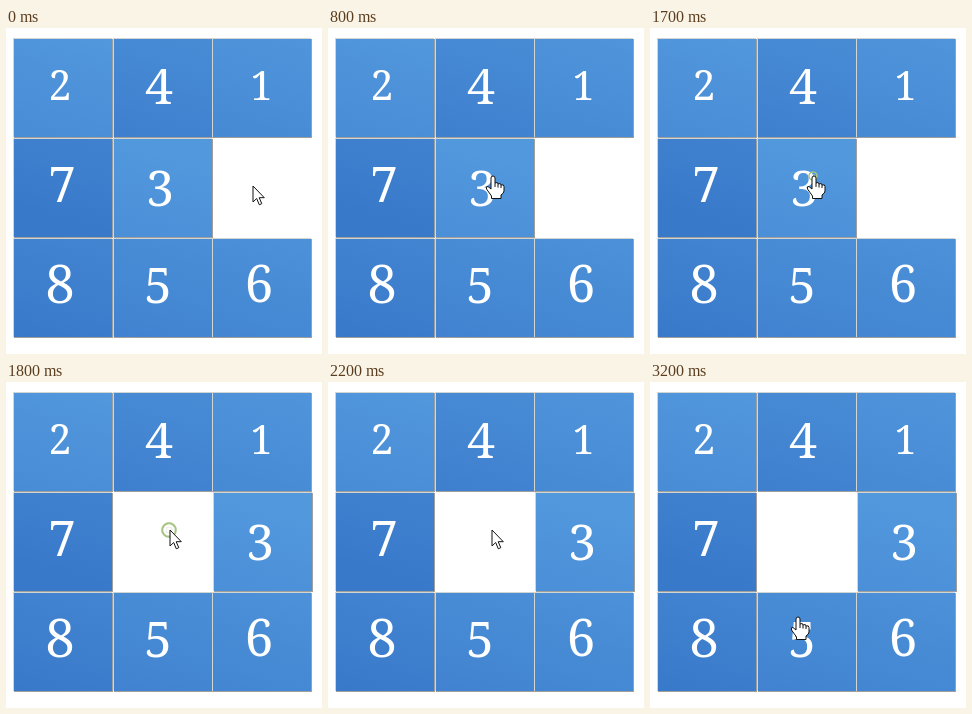
These frames come from a looping animation (316x326 px, 3.3 s). An HTML page:

```html
<!DOCTYPE html>
<html lang="en">
<head>
<meta charset="utf-8">
<title>Sliding puzzle</title>
<style>
  html, body { margin: 0; width: 100%; height: 100%; overflow: hidden; background: #fff; }
  svg { display: block; width: 316px; height: 326px; }
  text {
    font-family: "Noto Serif", serif;
    font-variant-numeric: lining-nums;
    fill: #fff;
    text-anchor: middle;
  }

  /* every change is a hard cut; 100 ms = 3.03 % */
  #tile3, #cursor, #arrow, #hand, #ring { animation: 3300ms step-end infinite; }
  #tile3 { animation-name: slide; }
  #cursor { animation-name: move; }
  #arrow { animation-name: arrow; }
  #hand { animation-name: hand; }
  #ring { animation-name: ring; transform-origin: 0 0; }

  @keyframes slide {
    0% { transform: translate(0, 0); }
    54.54%, 100% { transform: translate(100px, 0); }
  }
  @keyframes move {
    0% { transform: translate(247px, 158px); }
    3.03% { transform: translate(232px, 154px); }
    6.06% { transform: translate(198px, 149px); }
    9.09% { transform: translate(172px, 148px); }
    12.12% { transform: translate(167px, 148px); }
    15.15%, 48.48% { transform: translate(165px, 148px); }
    51.51%, 84.84% { transform: translate(164px, 148px); }
    87.87% { transform: translate(161px, 168px); }
    90.9% { transform: translate(155px, 200px); }
    93.93% { transform: translate(150px, 226px); }
    96.96%, 100% { transform: translate(148px, 235px); }
  }
  @keyframes arrow {
    0%, 54.54% { opacity: 1; }
    6.06%, 93.93%, 100% { opacity: 0; }
  }
  @keyframes hand {
    0%, 54.54% { opacity: 0; }
    6.06%, 93.93%, 100% { opacity: 1; }
  }
  @keyframes ring {
    0% { transform: scale(.4); opacity: 0; }
    51.51% { transform: scale(.45); opacity: 1; }
    54.54% { transform: scale(.75); opacity: 1; }
    57.57% { transform: scale(1); opacity: 1; }
    60.6% { transform: scale(1.12); opacity: .6; }
    63.63% { transform: scale(1.2); opacity: .25; }
    66.66%, 100% { transform: scale(1.2); opacity: 0; }
  }
</style>
</head>
<body>
<svg viewBox="0 0 316 326">
  <defs>
    <linearGradient id="sky" gradientUnits="userSpaceOnUse" x1="200" y1="0" x2="110" y2="300">
      <stop offset="0" stop-color="#5298dd"/>
      <stop offset="1" stop-color="#3979ca"/>
    </linearGradient>
  </defs>
  <g id="board"></g>
  <g transform="translate(163 148)">
    <g id="ring" fill="none">
      <circle r="9" stroke="#a8c583" stroke-width="2.8"/>
      <circle r="4" stroke="#dedfd6"/>
    </g>
  </g>
  <g id="cursor" fill="#fff" stroke="#111" stroke-linejoin="round">
    <path id="arrow" d="M0 0V16L3.7 12.5L6.3 18.8L8.8 17.7L6.2 11.7H11.3Z"/>
    <path id="hand" d="M-2 2Q-2 0 0 0T2 2V7Q5 5.5 5 8Q8 6.5 8 9Q11 8 11 10.5V15Q11 17 8 19V22.5H-1.5V20L-6.5 13Q-7.5 10-5 10.5L-2 13ZM2 7V11M5 8V11.5M8 9V12"/>
  </g>
</svg>
<script>
  const NS = "http://www.w3.org/2000/svg";
  const board = document.getElementById("board");
  const cols = [8, 108, 207];
  const rows = [11, 111, 211];

  // digit, text centre, baseline, font size; null is the gap
  const slots = [
    [2, 54, 72, 41], [4, 153, 76, 50], [1, 255.5, 72, 40],
    [7, 56, 174, 50], [3, 154, 178, 50], null,
    [8, 54, 275, 52], [5, 152, 275, 50], [6, 253, 274, 51]
  ];

  function add(parent, tag, attrs) {
    const el = document.createElementNS(NS, tag);
    for (const name in attrs) el.setAttribute(name, attrs[name]);
    return parent.appendChild(el);
  }

  function box(parent, x, y, size, fill) {
    return add(parent, "rect", { x, y, width: size, height: size, fill });
  }

  slots.forEach((slot, i) => {
    if (!slot) return;
    const [digit, cx, base, size] = slot;
    const x = cols[i % 3], y = rows[Math.floor(i / 3)];
    const home = digit - 1;
    const hx = home % 3 * 100, hy = Math.floor(home / 3) * 100;
    const tile = add(board, "g", { id: "tile" + digit });

    box(tile, x - 1, y - 1, 99, "#d3d5d3");
    box(tile, x, y, 99, "#a09f9b");
    // each tile shows its own piece of the shared gradient
    box(tile, hx, hy, 98, "url(#sky)")
      .setAttribute("transform", `translate(${x - hx} ${y - hy})`);
    add(tile, "text", { x: cx, y: base, "font-size": size }).textContent = digit;
  });

  // the sliding tile lies above its neighbours
  board.appendChild(document.getElementById("tile3"));
</script>
</body>
</html>
```
